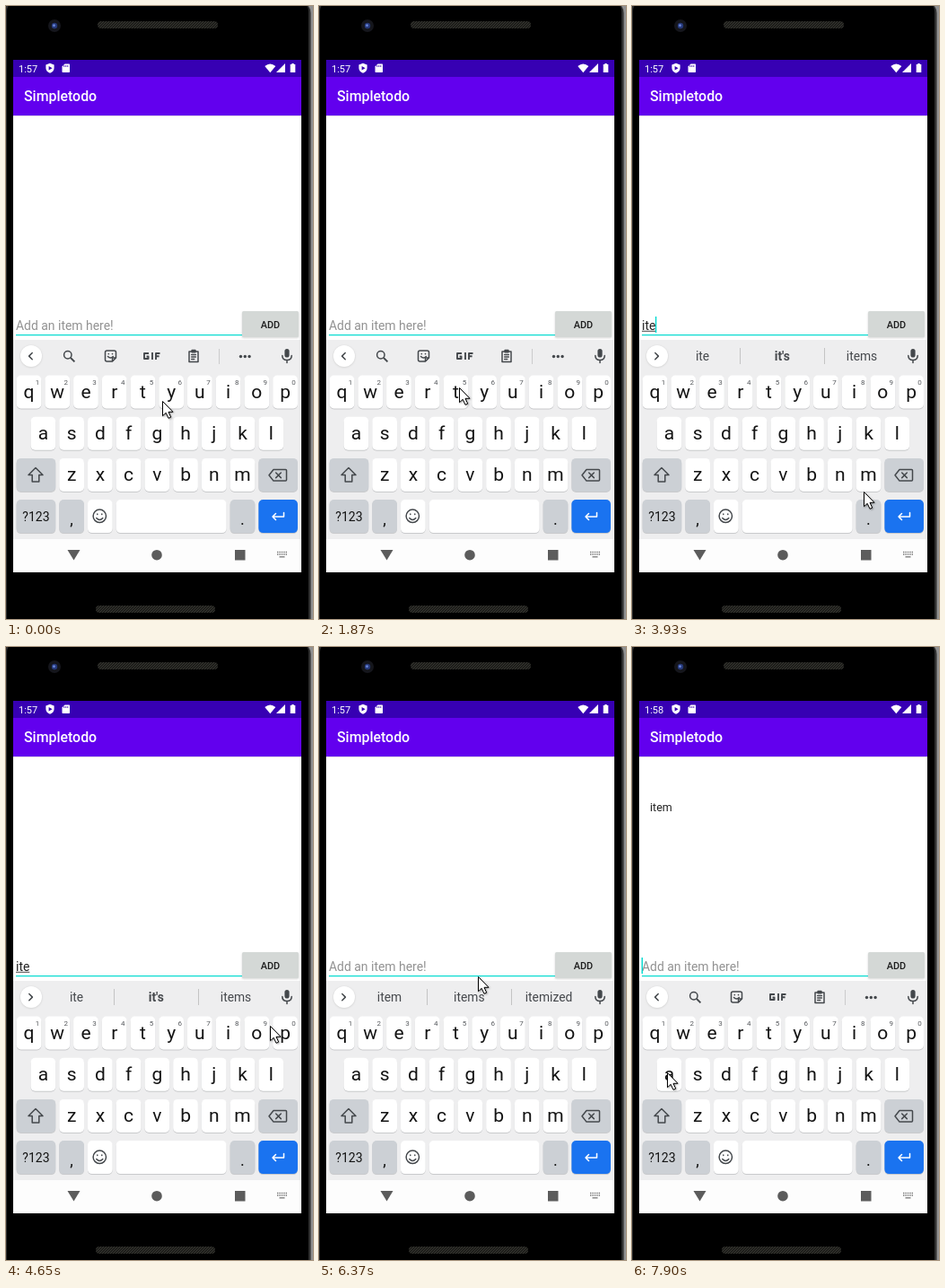
An HTML page that plays this animation: 342 by 683 pixels, repeating every 8000 ms.

```html
<!DOCTYPE html>
<html lang="en">
<head>
<meta charset="utf-8">
<title>To-do app</title>
<style>
html, body { margin: 0; width: 100%; height: 100%; overflow: hidden; background: #000; }
svg { display: block; width: 342px; height: 683px; font-family: Roboto, sans-serif; }
.line { fill: none; stroke: #44484c; stroke-width: 1.5; stroke-linejoin: round; stroke-linecap: round; }
.bold { stroke-width: 1.9; stroke-linecap: butt; }
.dark { fill: #44484c; }
.mid { text-anchor: middle; }
</style>
</head>
<body>
<svg viewBox="0 0 342 683">
  <defs>
    <pattern id="mesh" width="3" height="3" patternUnits="userSpaceOnUse">
      <rect width="3" height="3" fill="#1c1c19"/><path d="M0 3L3 0" stroke="#3a3a34" stroke-width=".9"/>
    </pattern>
    <clipPath id="buttonClip"><rect x="263" y="340" width="63" height="29" rx="1.5"/></clipPath>
    <filter id="soft" x="-50%" y="-50%" width="200%" height="200%"><feGaussianBlur stdDeviation="1"/></filter>
  </defs>

  <!-- phone body -->
  <rect width="342" height="683" fill="#909090"/>
  <rect x="-20" y="-6" width="359.5" height="720" rx="14" fill="#303030"/>
  <rect x="1" y="-6" width="336" height="720" rx="12"/>
  <circle cx="54" cy="22" r="7" fill="#15161c"/>
  <circle cx="54" cy="22" r="3.2" fill="#26397a"/>
  <circle cx="53.5" cy="21.7" r="1.4" fill="#6a86d8"/>
  <rect x="102" y="17" width="134" height="8" rx="4" fill="url(#mesh)"/>
  <rect x="100" y="668" width="133" height="8" rx="4" fill="url(#mesh)"/>

  <!-- app -->
  <rect x="8" y="60" width="321" height="571" fill="#fff"/>
  <rect x="8" y="122" width="321" height="1" fill="#e2dfe8"/>
  <rect x="8" y="60" width="321" height="19" fill="#3700b3"/>
  <rect x="8" y="79" width="321" height="43" fill="#6200ee"/>
  <g fill="#fff">
    <text id="clock" x="14" y="73.5" font-size="11"></text>
    <path d="M49 63.8l4.6 1.8v3.4q0 4-4.6 5.8q-4.6-1.8-4.6-5.8v-3.4z"/>
    <path d="M47.6 67l4 2.2l-4 2.2z" fill="#3700b3"/>
    <path d="M65.5 64.5h4.8q.7 0 .7.7v8.1q0 .7-.7.7h-7.1q-.7 0-.7-.7v-5.8z"/>
    <path d="M64.8 66v2M66.8 66v2M68.8 66v2" stroke="#3700b3" stroke-width=".8"/>
    <path d="M288.3 67q6-5 12 0l-6 7.3z"/>
    <path d="M311 64v10h-10z"/>
    <path d="M318.3 64h2.4v1.1h1.6v9h-5.6v-9h1.6z"/>
    <text x="20" y="106" font-size="15.9" font-weight="500">Simpletodo</text>
  </g>
  <text id="item" x="20" y="183" font-size="12.5" fill="#222">item</text>

  <!-- entry row -->
  <text id="entry" x="11" y="360.6" font-size="13.95"></text>
  <path id="underline" stroke="#333" stroke-width=".9"/>
  <rect x="11" y="366" width="252" height="1.2" fill="#03dad0"/>
  <rect id="caret" y="346" width="1.4" height="18" fill="#03dad0"/>
  <rect x="263" y="341" width="63" height="29" rx="1.5" fill="#999" opacity=".4" filter="url(#soft)"/>
  <g clip-path="url(#buttonClip)">
    <rect x="263" y="340" width="63" height="29" fill="#d4d8d6"/>
    <circle id="ripple" cx="303" cy="355" r="25" fill="#b9c0be"/>
  </g>
  <text class="mid" x="294.5" y="358.5" font-size="10.9" font-weight="500" fill="#1c1c1c">ADD</text>

  <!-- keyboard -->
  <rect x="8" y="372" width="321" height="222" fill="#eeeeef"/>
  <circle cx="28" cy="390.6" r="12" fill="#ccc" filter="url(#soft)"/>
  <circle cx="28" cy="390" r="12" fill="#fff"/>
  <path id="chevron" class="line"/>
  <g id="tools">
    <circle class="line" cx="68.8" cy="388.7" r="4.2"/><path class="line bold" d="M72 392l4.4 4.4"/>
    <path class="line" d="M112.5 384h8q2 0 2 2v6l-4 4h-6q-2 0-2-2v-8q0-2 2-2zM122 392h-3.5v3.5"/>
    <path class="line" d="M113.5 390.5q3 3 5.8 0M114.3 387.5v.2M118.5 387.5v.2"/>
    <path class="line bold" d="M159 387h-5v6h4.5v-2.5h-2M163 386v8M167 394v-7h4.5M167 390.3h3.6"/>
    <path class="line" d="M204 385h10v11.5h-10zM206.7 388.5h4.6M206.7 391h4.6M206.7 393.5h3"/>
    <rect class="dark" x="206.3" y="382.8" width="5.4" height="3.6" rx="1"/>
    <path d="M237.5 382v17" stroke="#ccc"/>
    <g class="dark"><circle cx="261.5" cy="390.5" r="1.7"/><circle cx="266.3" cy="390.5" r="1.7"/><circle cx="271.1" cy="390.5" r="1.7"/></g>
  </g>
  <g id="words" class="mid" font-size="13.8" fill="#45484c">
    <path d="M120.5 381v18M214.5 381v18" stroke="#c4c4c4"/>
    <text x="78.5" y="395.4"></text><text x="167.3" y="395.4"></text><text x="256" y="395.4"></text>
  </g>
  <rect class="dark" x="310.4" y="382" width="5.2" height="9.6" rx="2.6"/>
  <path class="line" d="M307.8 389.5q0 5 5.2 5t5.2-5M313 394.7v2.8"/>
  <g id="keys"></g>
  <g class="line">
    <path d="M33 514.5l8 8h-4.2v7.5h-7.6v-7.5h-4.2z"/>
    <path d="M298 516.5h13.5q1 0 1 1v10.6q0 1-1 1h-13.5l-5-6.3zM300.7 520l5.6 5.6M306.3 520l-5.6 5.6"/>
    <circle cx="104.3" cy="568.3" r="7.2"/>
    <path d="M100.8 570.5q3.5 4 7 0M101.8 566v.4M106.8 566v.4"/>
    <path d="M309.5 564.5v4.5h-12.5M300.5 565.5l-3.5 3.5l3.5 3.5" style="stroke:#fff"/>
  </g>

  <!-- navigation bar -->
  <rect x="8" y="594" width="321" height="37" fill="#fdfdfd"/>
  <g fill="#5c5c5c">
    <path d="M68.5 606h14l-7 11.5z"/><circle cx="168" cy="611.7" r="5.8"/><rect x="255" y="606" width="11.5" height="11.5"/>
  </g>
  <path d="M302 608.5h11M302 611h11" stroke="#777" stroke-width="1.4" stroke-dasharray="1.4 1"/>
  <path d="M304.5 613.8h6" stroke="#777" stroke-width="1.3"/>

  <g id="pointer">
    <path d="M1 1v17l4-3.5l3 6l3-1.3l-2.8-6h5.3z" fill="#000" opacity=".4" filter="url(#soft)"/>
    <path d="M.5 .5v16.2l3.7-3.4l2.8 6l2.7-1.2l-2.7-5.8h5z" fill="#fff" stroke="#000" stroke-linejoin="round"/>
  </g>
</svg>
<script>
const LOOP = 8000, BLINK = 500;
const $ = id => document.getElementById(id);

function add(parent, tag, attrs, text = '') {
  const el = document.createElementNS('http://www.w3.org/2000/svg', tag);
  for (const name in attrs) el.setAttribute(name, attrs[name]);
  el.textContent = text;
  return parent.appendChild(el);
}

// The keyboard is a grid: every row is centred on the screen.
const PITCH = 31.73, ROW = 46.2, GAP = 4, CENTER = 168.3, GREY = '#ccd0d5';
const keys = $('keys');

function key(column, row, { span = 1, fill = '#fff', label = '', size = 21, drop = 6.6, hint = '' } = {}) {
  const x = CENTER + (column - 5) * PITCH + GAP / 2, y = 411.5 + row * ROW;
  const width = span * PITCH - GAP, middle = x + width / 2;
  add(keys, 'rect', { x, y: y + 1, width, height: 37, rx: 5, fill: '#c9cacc' });
  add(keys, 'rect', { x, y, width, height: 37, rx: 5, fill });
  add(keys, 'text', { class: 'mid', x: middle, y: y + 18.5 + drop, 'font-size': size, fill: '#141414' }, label);
  add(keys, 'text', { class: 'mid', x: middle + 9.5, y: y + 10, 'font-size': 8, fill: '#55585c' }, hint);
}

['qwertyuiop', 'asdfghjkl', 'zxcvbnm'].forEach((letters, row) =>
  [...letters].forEach((label, i) =>
    key(5 - letters.length / 2 + i, row, { label, hint: row ? '' : (i + 1) % 10 })));
key(0, 2, { span: 1.5, fill: GREY });
key(8.5, 2, { span: 1.5, fill: GREY });
key(0, 3, { span: 1.5, fill: GREY, label: '?123', size: 14, drop: 5 });
key(1.5, 3, { fill: GREY, label: ',', size: 18, drop: 9 });
key(2.5, 3);
key(3.5, 3, { span: 4 });
key(7.5, 3, { fill: GREY, label: '.', size: 18, drop: 9 });
key(8.5, 3, { span: 1.5, fill: '#1a73f0' });

// Pointer stops: [time, x, y].
const stops = [
  [370, 174, 440], [980, 251, 428], [1630, 244, 428], [1870, 156, 425], [2770, 88, 433], [3170, 106, 434],
  [3930, 258, 541], [4410, 252, 524], [4800, 314, 372], [5310, 303, 355], [5730, 209, 377], [6370, 177, 367],
  [7050, 165, 535], [7360, 244, 487], [7480, 92, 479], [7750, 194, 540], [7900, 39, 474]
];

// Text field, suggestions (* is bold) and the moment the caret lights up.
const edits = [
  { at: 0, caret: 370, text: '' },
  { at: 1990, caret: 2190, text: 'i', words: ['i', '*I', "I'm"] },
  { at: 3290, caret: 3290, text: 'it', words: ['it', "*it's", 'its'] },
  { at: 3690, caret: 3690, text: 'ite', words: ['ite', "*it's", 'items'] },
  { at: 4800, caret: 4860, text: 'item', words: ['item', 'items', 'itemized'] },
  { at: 6010, caret: 5760, text: '', words: ['item', 'items', 'itemized'] },
  { at: 6760, caret: 6760, text: '' }
];
const CLEARED = 6010, LISTED = 6760, PRESSED = 5310, NEXT_MINUTE = 7000;

const show = (el, on) => el.style.display = on ? '' : 'none';
const ease = k => k * k * (3 - 2 * k);

function pointerAt(t) {
  const next = stops.findIndex(([at]) => at > t);
  if (next < 1) return stops.at(next).slice(1);
  const [t0, ...from] = stops[next - 1], [t1, ...to] = stops[next];
  const k = ease((t - t0) / (t1 - t0));
  return from.map((v, i) => Math.round(v + (to[i] - v) * k));
}

function draw(t) {
  const { caret, text, words } = edits.findLast(edit => edit.at <= t);
  const entry = $('entry');
  entry.textContent = text || 'Add an item here!';
  entry.setAttribute('fill', text ? '#222' : '#929292');
  const width = text ? entry.getComputedTextLength() : 0;
  $('underline').setAttribute('d', text ? `M11 362.3h${width}` : '');
  $('caret').setAttribute('x', 10.6 + width);
  show($('caret'), (t - caret + LOOP) % (2 * BLINK) < BLINK);

  show($('tools'), !words);
  show($('words'), words);
  $('chevron').setAttribute('d', words ? 'M25.8 386.5l3.6 3.6l-3.6 3.6' : 'M29.2 386.5l-3.6 3.6l3.6 3.6');
  if (words) $('words').querySelectorAll('text').forEach((el, i) => {
    el.textContent = words[i].replace('*', '');
    el.setAttribute('font-weight', words[i][0] === '*' ? 700 : 400);
  });

  show($('ripple'), t >= PRESSED && t < CLEARED);
  show($('item'), t >= LISTED);
  $('clock').textContent = t < NEXT_MINUTE ? '1:57' : '1:58';
  $('pointer').setAttribute('transform', `translate(${pointerAt(t)})`);
}

const origin = performance.now();
function frame() {
  draw((performance.now() - origin) % LOOP);
  requestAnimationFrame(frame);
}
frame();
</script>
</body>
</html>
```
